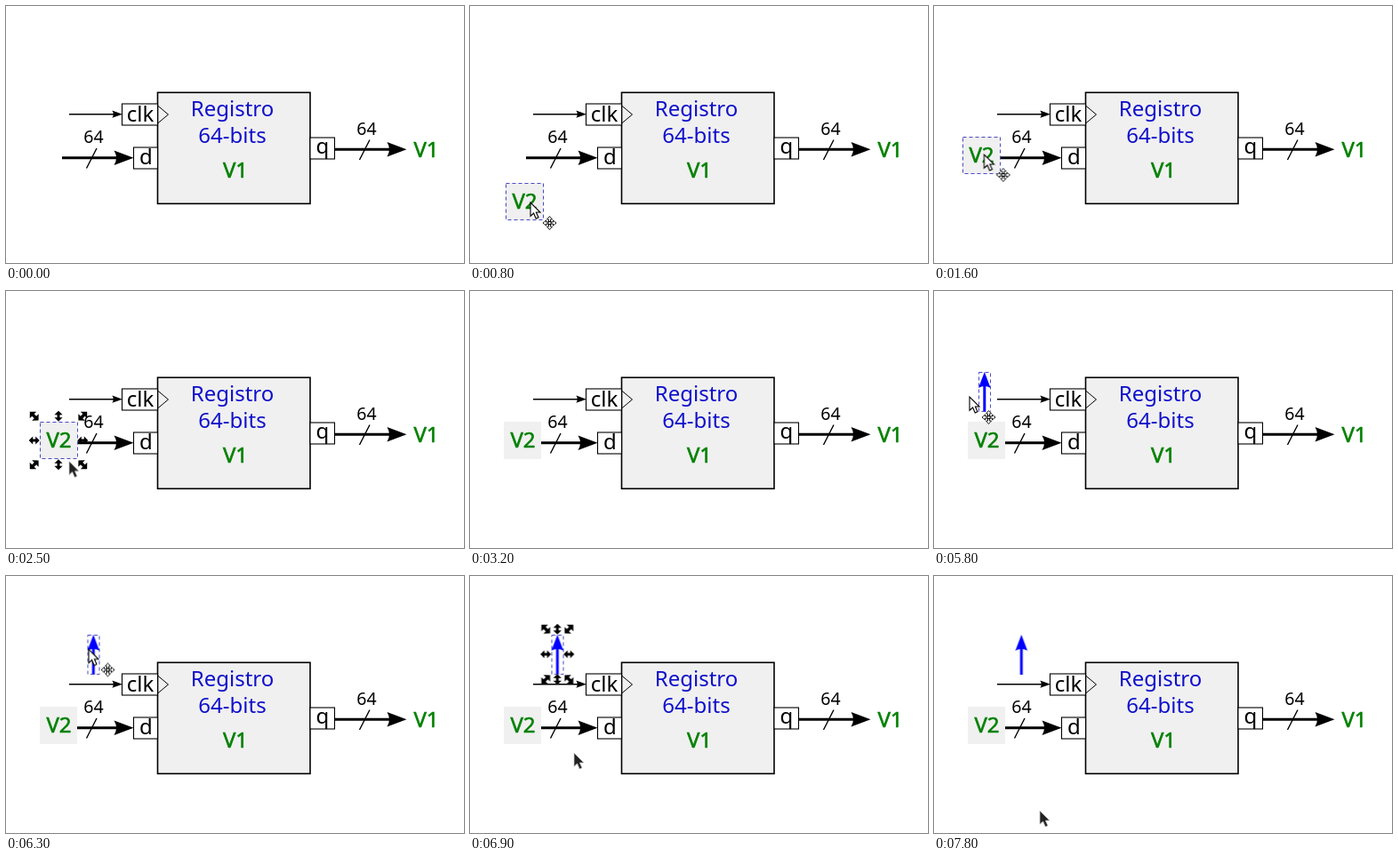
An HTML page that plays this animation: 515x289 px, repeating every 8 s.

```html
<!DOCTYPE html>
<html lang="es">
<head>
<meta charset="utf-8">
<title>Registro de 64 bits</title>
<style>
html, body { margin: 0; width: 100%; height: 100%; overflow: hidden; background: #fff; }
svg { display: block; width: 100vw; height: 100vh; }
text { font: 24px "Noto Sans", "Open Sans", sans-serif; text-anchor: middle; }
.small { font-size: 19.5px; }
.title { fill: #1010cc; }
.value { fill: #008000; stroke: #008000; stroke-width: .6; }
.wire { stroke: #000; fill: none; }
.box { fill: #fff; stroke: #000; stroke-width: 1.1; }
.frame { fill: none; stroke: #4a4ac4; stroke-dasharray: 4 3; }

/* One loop is 8 s, so 1.25% is one 100 ms tick. */
#v2, #up, #cursor { animation: 8s infinite; }
#v2 { animation-name: v2-move, from-500; }
#up { animation-name: up-move, from-5400; }
#cursor { animation-name: cursor-move, cursor-show; }
#v2, #up, #cursor { animation-timing-function: linear, step-end; }
.flag { animation: 8s step-end infinite; }
#v2 .frame { animation-name: v2-frame; }
#v2 .handles { animation-name: v2-handles; }
#up .frame { animation-name: up-frame; }
#up .handles { animation-name: up-handles; }
#drag { animation-name: drag; }
#plain { animation-name: plain; }

@keyframes v2-move {
  0%, 6.25% { transform: translate(79px, 253px); animation-timing-function: steps(3); }
  10% { transform: translate(40px, 199px); animation-timing-function: steps(2); }
  12.5% { transform: translate(31px, 169px); animation-timing-function: steps(3); }
  16.25% { transform: translate(23px, 147px); animation-timing-function: steps(5); }
  22.5%, 100% { transform: translate(38px, 147px); }
}
@keyframes up-move {
  0%, 67.5% { transform: translate(82px, 247px); animation-timing-function: steps(3); }
  71.25% { transform: translate(40px, 112px); animation-timing-function: step-end; }
  72.5% { transform: translate(50px, 91px); animation-timing-function: steps(4); }
  77.5%, 100% { transform: translate(91.5px, 66px); }
}
@keyframes cursor-move {
  0%, 6.25% { transform: translate(107px, 275px); animation-timing-function: steps(3); }
  10% { transform: translate(68px, 221px); animation-timing-function: steps(2); }
  12.5% { transform: translate(58px, 190px); animation-timing-function: steps(3); }
  16.25% { transform: translate(48px, 167px); animation-timing-function: steps(5); }
  22.5%, 28.75% { transform: translate(62px, 167px); animation-timing-function: steps(4); }
  33.75%, 35% { transform: translate(80px, 216px); animation-timing-function: steps(3); }
  38.75%, 40% { transform: translate(76px, 251px); animation-timing-function: step-end; }
  67.5% { transform: translate(80px, 267px); animation-timing-function: steps(3); }
  71.25% { transform: translate(29px, 138px); animation-timing-function: step-end; }
  72.5% { transform: translate(40px, 119px); animation-timing-function: steps(4); }
  77.5% { transform: translate(92px, 84px); animation-timing-function: steps(2); }
  80%, 81.25% { transform: translate(94px, 81px); animation-timing-function: steps(4); }
  86.25%, 87.5% { transform: translate(117px, 199px); animation-timing-function: steps(3); }
  91.25%, 93.75% { transform: translate(110px, 251px); animation-timing-function: steps(3); }
  97.5%, 100% { transform: translate(119px, 264px); }
}
@keyframes from-500 { 0% { opacity: 0; } 6.25%, 100% { opacity: 1; } }
@keyframes from-5400 { 0% { opacity: 0; } 67.5%, 100% { opacity: 1; } }
@keyframes cursor-show { 0%, 40% { opacity: 0; } 6.25%, 67.5%, 100% { opacity: 1; } }
@keyframes v2-frame { 0% { opacity: 1; } 38.75%, 100% { opacity: 0; } }
@keyframes v2-handles { 0%, 38.75%, 100% { opacity: 0; } 30% { opacity: 1; } }
@keyframes up-frame { 0% { opacity: 1; } 96.25%, 100% { opacity: 0; } }
@keyframes up-handles { 0%, 96.25%, 100% { opacity: 0; } 82.5% { opacity: 1; } }
@keyframes drag { 0%, 67.5% { opacity: 1; } 30%, 82.5%, 100% { opacity: 0; } }
@keyframes plain { 0%, 67.5% { opacity: 0; } 30%, 82.5%, 100% { opacity: 1; } }
</style>
</head>
<body>
<svg viewBox="0 0 515 289" preserveAspectRatio="none">
  <defs>
    <path id="head" d="M0 0L-22 -8.3Q-17 0 -22 8.3Z"/>
    <path id="pointer" d="M0 0V15.2L3.6 12L6.2 18L9 16.8L6.4 11H11Z"/>
    <path id="handle" d="M-6 0L-1.5 -4.6V-1.5H1.5V-4.6L6 0L1.5 4.6V1.5H-1.5V4.6Z"/>
    <path id="tick" d="M0 -7.5L3 -4H1V-1H-1V-4H-3Z"/>
  </defs>

  <rect x="170.5" y="97.3" width="171.5" height="125" fill="#f0f0f0" stroke="#000" stroke-width="1.6"/>
  <rect class="box" x="130.5" y="110" width="40" height="24"/>
  <rect class="box" x="143.5" y="159" width="27" height="24"/>
  <rect class="box" x="342" y="148" width="27.5" height="24"/>
  <path class="wire" d="M170.5 112L182.5 122L170.5 132"/>

  <path class="wire" stroke-width="1.6" d="M71 121.7H123"/>
  <use href="#head" transform="translate(131 121.7) scale(.53 .5)"/>
  <path class="wire" stroke-width="3.1" d="M63 170.7H126M370 161.3H433"/>
  <use href="#head" x="143.5" y="170.7"/>
  <use href="#head" x="450.5" y="161.3"/>
  <path class="wire" stroke-width="1.4" d="M90.5 182.5L102 160M397.500 173L409 150.500"/>

  <text class="title" x="254.500" y="123.500">Registro</text>
  <text class="title" x="254.500" y="154">64-bits</text>
  <text class="value" x="258" y="192.500">V1</text>
  <text class="value" x="472.500" y="170">V1</text>
  <text x="151" y="130">clk</text>
  <text x="157.500" y="178">d</text>
  <text x="356" y="166">q</text>
  <text class="small" x="98.500" y="154">64</text>
  <text class="small" x="405.500" y="145">64</text>

  <g id="v2">
    <rect width="42" height="42" fill="#f0f0f0"/>
    <text class="value" x="21.500" y="29">V2</text>
    <rect class="frame flag" x=".5" y=".5" width="42" height="41"/>
    <g class="handles flag" data-size="42 42"></g>
  </g>

  <g id="up">
    <path d="M6.800 14V45" stroke="#00f" stroke-width="3"/>
    <use href="#head" fill="#00f" transform="translate(6.800 0) rotate(-90) scale(.82)"/>
    <rect class="frame flag" x=".5" y=".5" width="13" height="44"/>
    <g class="handles flag" data-size="13.5 44"></g>
  </g>

  <g id="cursor">
    <g id="drag" class="flag">
      <use href="#pointer" fill="#fff" stroke="#000" stroke-width="1.1"/>
      <g transform="translate(21.500 23)">
        <path d="M0 -8L8 0L0 8L-8 0Z" fill="#fff"/>
        <g id="cross" fill="#fff" stroke="#000" stroke-width=".9"></g>
        <rect x="-1.500" y="-1.500" width="3" height="3" fill="#fff" stroke="#000"/>
      </g>
    </g>
    <use id="plain" class="flag" href="#pointer" fill="#222" stroke="#c4c4c4" stroke-width=".8"/>
  </g>
</svg>
<script>
const use = (id, transform) => `<use href="#${id}" transform="${transform}"/>`;

// Eight double arrows around a selected object
for (const group of document.querySelectorAll('.handles')) {
  const [w, h] = group.dataset.size.split(' ').map(Number);
  const gap = 6.3;
  for (const i of [-1, 0, 1]) for (const j of [-1, 0, 1]) {
    if (!i && !j) continue;
    const x = w / 2 + i * (w / 2 + gap);
    const y = h / 2 + j * (h / 2 + gap);
    const angle = Math.atan2(j, i) * 180 / Math.PI;
    const scale = i && j ? 1.15 : 1;
    group.innerHTML += use('handle', `translate(${x} ${y}) rotate(${angle}) scale(${scale})`);
  }
}

document.getElementById('cross').innerHTML =
  [0, 90, 180, 270].map(a => use('tick', `rotate(${a})`)).join('');
</script>
</body>
</html>
```
